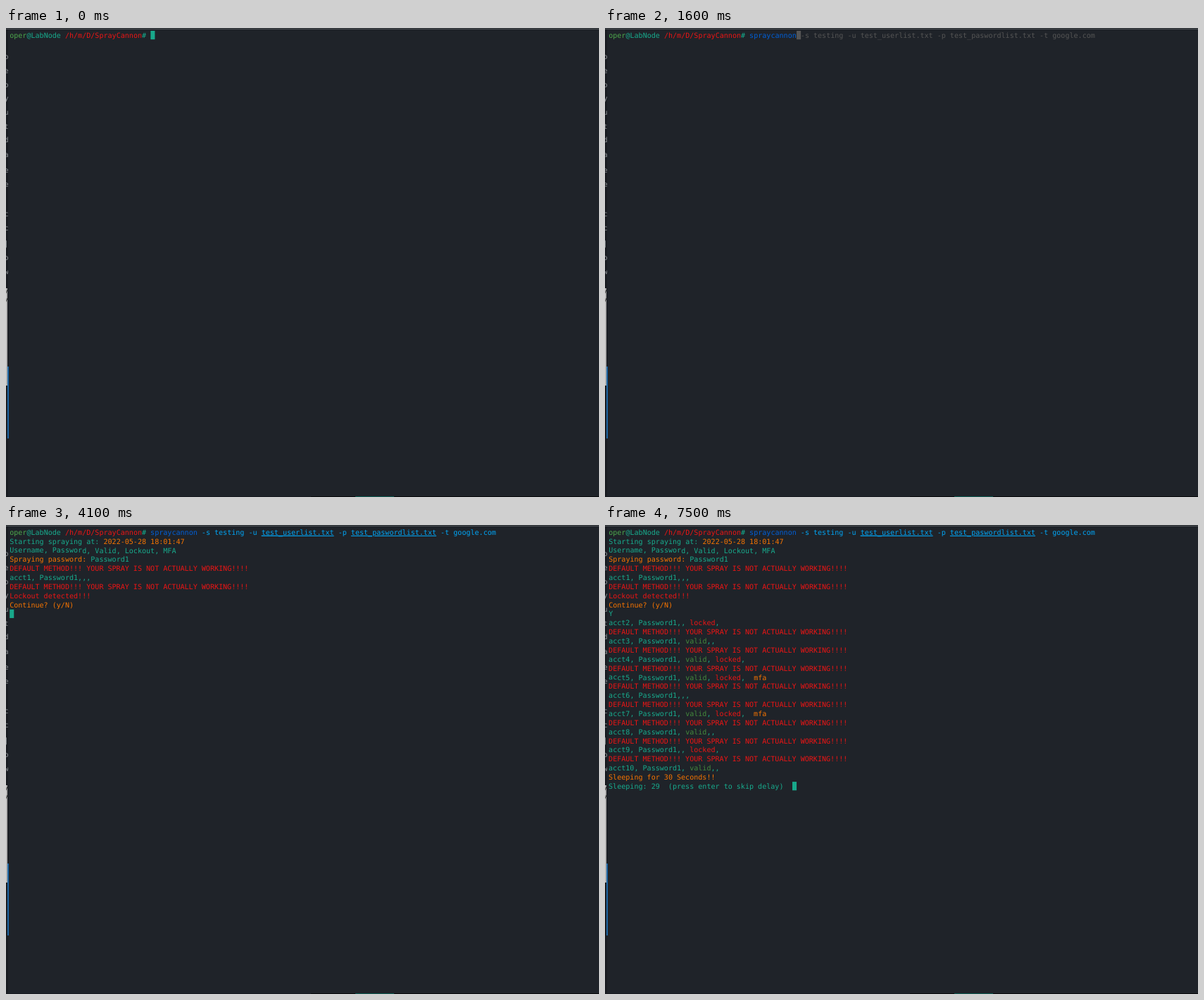
Animation, 842 px wide and 665 px high, one loop 8000 ms. Source, as an HTML page:

```html
<!DOCTYPE html>
<html lang="en">
<head>
<meta charset="utf-8">
<title>Terminal session</title>
<style>
  html, body { margin: 0; width: 100%; height: 100%; overflow: hidden; background: #1f2329; }
  .stage { position: relative; width: 842px; height: 665px; overflow: hidden; background: #1f2329; }
  .stage > * { position: absolute; }
  .screen, .behind {
    font-family: "DejaVu Sans Mono", monospace;
    font-size: 10.074px;
    line-height: 13px;
    text-rendering: geometricPrecision;
    font-variant-ligatures: none;
  }
  .screen { left: 0; top: 0; }
  .screen text { white-space: pre; fill: #18ab8d; }
  .screen .user { fill: #4ca64c; }
  .screen .red { fill: #ed1515; }
  .screen .orange { fill: #f67400; }
  .screen .green { fill: #43893c; }
  .screen .cmd { fill: #005fd7; }
  .screen .arg, .screen .file { fill: #00a5f5; }
  .screen .file { text-decoration: underline 1px; text-underline-offset: 1px; text-decoration-skip-ink: none; }
  .screen .hint { fill: #555; }
  .screen .under { fill: #1f2329; }

  .behind { left: 0; top: 0; width: 3px; height: 665px; overflow: hidden; background: #191c21; color: #92969a; }
  .behind span { position: absolute; right: -.5px; }
  .behind .page { left: 0; top: 369px; width: 2px; height: 138px; background: #b3b3b3; }
  .behind .slash { color: #222; }
  .accent { left: 2px; top: 480px; width: 2px; height: 102px; background: #1d66a4; }
  .top { left: 0; top: 0; width: 842px; height: 1px; background: #24282d; border-bottom: 1px solid #505458; }
  .bottom { left: 0; top: 664px; width: 842px; height: 1px;
    background: linear-gradient(90deg, #181b20 433px, #08090b 433px 496px, #0c5a50 496px 551px, #08090b 551px); }
</style>
</head>
<body>
<div class="stage">
  <div class="behind"><span class="page"></span></div>
  <div class="accent"></div>
  <div class="top"></div>
  <div class="bottom"></div>
  <svg class="screen" width="842" height="665">
    <rect class="cursor" width="6.065" height="12.2"/>
    <!-- the tiny turn keeps baselines off the pixel grid -->
    <g class="lines" transform="rotate(.02 150 0)"></g>
  </svg>
</div>
<script>
const LOOP = 8000, CELL = 6.065, ROW = 12.86, LEFT = 5.2, TOP = 4, BASE = 13.8;
const TEAL = '#18a88b', GREY = '#555';
const $ = s => document.querySelector(s);
const paint = (cls, text) => `<tspan class="${cls}">${text}</tspan>`;

// Window edge: letters peeking out from behind the terminal
const peek = (ch, y, cls = '') => {
  const el = document.createElement('span');
  el.className = cls;
  el.textContent = ch;
  el.style.top = y - 6 + 'px';
  $('.behind').append(el);
};
const edgeY = [41, 61, 81, 100, 120, 140, 159, 180, 202, 222, 264, 284, 306, 326, 346];
[...'oeoyutdaeecc|ow'].forEach((ch, i) => peek(ch, edgeY[i]));
[375, 387].forEach(y => peek('/', y, 'slash'));

const prompt = paint('user', 'oper') + '@LabNode ' + paint('red', '/h/m/D/SprayCannon') + '# ';
const promptLen = 33;
const tool = 'spraycannon';
const args = ' -s testing -u test_userlist.txt -p test_paswordlist.txt -t google.com';
const full = tool + args;
const command = prompt + paint('cmd', tool) +
  paint('arg', args.replace(/test_\w+\.txt/g, f => paint('file', f)));

const warning = paint('red', 'DEFAULT METHOD!!! YOUR SPRAY IS NOT ACTUALLY WORKING!!!!');
const result = (n, flags) => `acct${n}, Password1,` +
  (flags.includes('v') ? ' ' + paint('green', 'valid') : '') + ',' +
  (flags.includes('l') ? ' ' + paint('red', 'locked') : '') + ',' +
  (flags.includes('m') ? '  ' + paint('orange', 'mfa') : '');

const started = [
  command,
  'Starting spraying at: ' + paint('orange', '2022-05-28 18:01:47'),
  'Username, Password, Valid, Lockout, MFA',
  paint('orange', 'Spraying password: ') + 'Password1',
  warning,
  result(1, ''),
  warning,
  paint('red', 'Lockout detected!!!'),
  paint('orange', 'Continue? (y/N)')
];
const results = ['l', 'v', 'vl', 'vlm', '', 'vlm', 'v', 'l', 'v']
  .flatMap((flags, i) => i ? [warning, result(i + 2, flags)] : [result(2, flags)]);

const view = (lines, row, col, color = TEAL) => ({ lines, row, col, color });

const typed = n => view([
  prompt + paint(n < tool.length ? 'red' : 'cmd', full.slice(0, n)) +
  paint('under', full[n]) + paint('hint', full.slice(n + 1))
], 0, promptLen + n, GREY);

const sleeping = left => view([
  ...started, 'Y', ...results,
  paint('orange', 'Sleeping for 30 Seconds!!'),
  `Sleeping: ${left}  (press enter to skip delay)`
], 28, 43);

const steps = [
  [0, view([prompt], 0, promptLen)],
  [500, typed(2)],
  [600, typed(5)],
  [1100, typed(8)],
  [1200, typed(9)],
  [1400, typed(10)],
  [1600, typed(11)],
  [2500, view([command], 0, promptLen + full.length)],
  [4100, view(started, 9, 0)],
  [5300, view([...started, 'Y'], 9, 1)],
  [6600, sleeping(30)],
  [7500, sleeping(29)]
];

const lines = $('.lines'), cursor = $('.cursor');
let shown;

function draw() {
  const t = performance.now() % LOOP;
  const now = steps.findLast(([at]) => at <= t)[1];
  if (now !== shown) {
    shown = now;
    lines.innerHTML = now.lines.map((line, i) =>
      `<text xml:space="preserve" x="${LEFT}" y="${BASE + i * ROW}">${line}</text>`).join('');
    cursor.setAttribute('x', LEFT + now.col * CELL);
    cursor.setAttribute('y', TOP + now.row * ROW);
    cursor.setAttribute('fill', now.color);
  }
  requestAnimationFrame(draw);
}
draw();
</script>
</body>
</html>
```
